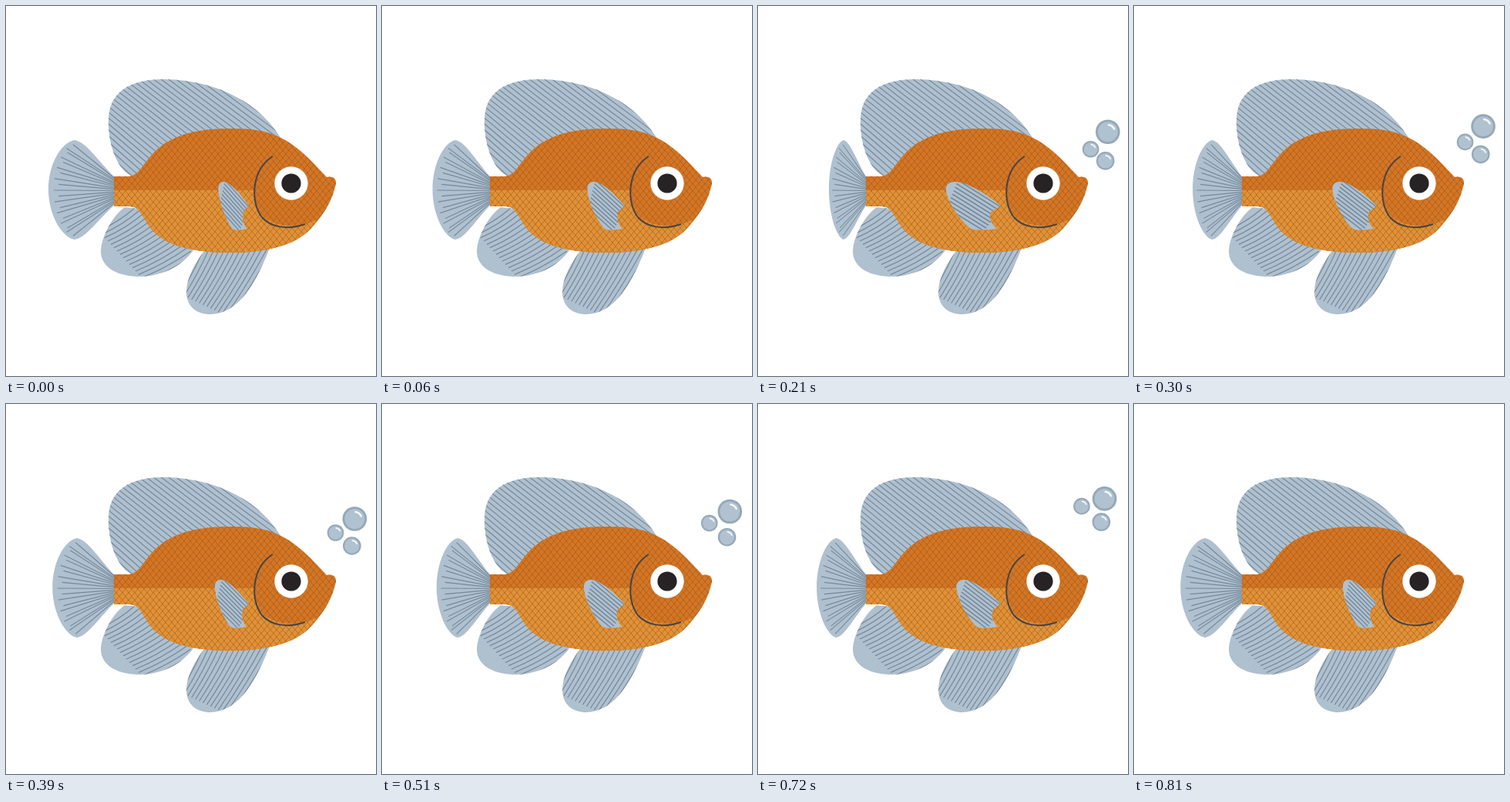
These frames come from a looping animation (480 px wide and 480 px high, 0.84 s). An HTML page with a canvas:

```html
<!DOCTYPE html>
<html lang="en">
<head>
<meta charset="utf-8">
<title>Swimming fish</title>
<style>
html, body { margin: 0; width: 100%; height: 100%; overflow: hidden; background: #fff; }
canvas { display: block; }
</style>
</head>
<body>
<canvas id="stage" width="480" height="480"></canvas>
<script>
const ctx = document.getElementById('stage').getContext('2d');
const LOOP = 840, STEP = 30, FLAP = 420;
const FIN = '#afc0cf', RAY = '#75899b';

const shapes = {
  dorsal: new Path2D('M162 220C143 211 132 177 133 147C134 112 160 95 205 95C276 96 332 128 358 174L300 215Z'),
  anal: new Path2D('M154 261C137 273 123 301 123 319C124 341 147 351 174 351C203 350 226 339 243 317L190 265Z'),
  pelvic: new Path2D('M259 315C245 334 234 352 234 372C235 391 248 400 265 400C304 399 326 355 342 314Z'),
  tail: new Path2D('M140 221C122 204 104 176 89 174C71 177 55 206 55 238C55 270 72 300 89 303C104 301 122 274 140 259Z'),
  pectoral: new Path2D('M282 228C277 228 275 233 275.5 239C277 257 286 277 292 287C295 292 301 291 312.5 289C308 283 306 276 308 267L315 259C307 248 292 228 282 228Z'),
  body: new Path2D('M140 221H158C187 221 176 159 290 159C352 158 374 176 416 222C424 220 429 224 428 231C423 252 415 267 398 286C380 308 344 320 290 320C163 319 191 260 160 260H140Z'),
  belly: new Path2D('M140 239H322C323 270 342 291 388 283L410 275V330H140Z'),
  gill: new Path2D('M346 195C319 212 316 253 332 274C343 287 365 291 388 283')
};

const lerp = (a, b, k) => a + (b - a) * k;

function clipped(path, paint) {
  ctx.save();
  ctx.clip(path);
  paint();
  ctx.restore();
}

// Rays blend from the first line to the last; each is [x0, y0, x1, y1].
function fin(path, first, last, count, bend = 0, extend = 0) {
  ctx.fillStyle = FIN;
  ctx.fill(path);
  clipped(path, () => {
    ctx.strokeStyle = RAY;
    ctx.lineWidth = 1.2;
    ctx.beginPath();
    for (let i = 0; i < count; i++) {
      const [x0, y0, x1, y1] = first.map((v, j) => lerp(v, last[j], i / (count - 1)));
      ctx.moveTo(x0 - (x1 - x0) * extend, y0 - (y1 - y0) * extend);
      ctx.quadraticCurveTo((x0 + x1) / 2 + bend, (y0 + y1) / 2 + bend, x1, y1);
    }
    ctx.stroke();
  });
}

function tail() {
  ctx.fillStyle = FIN;
  ctx.fill(shapes.tail);
  clipped(shapes.tail, () => {
    ctx.strokeStyle = RAY;
    ctx.lineWidth = 1.2;
    ctx.beginPath();
    for (let i = 0; i < 19; i++) {
      const k = i / 9 - 1;
      const reach = i % 2 ? 78 : 72;
      const angle = k * 0.93;
      ctx.moveTo(142, 239.5 + k * 15);
      ctx.lineTo(140 - reach * Math.cos(angle * 0.8), 239 + 66 * Math.sin(angle) * 1.12);
    }
    ctx.stroke();
  });
}

function scaleAbout(x, sx, paint) {
  ctx.save();
  ctx.translate(x, 0);
  ctx.scale(sx, 1);
  ctx.translate(-x, 0);
  paint();
  ctx.restore();
}

function disc(x, y, r, color) {
  ctx.fillStyle = color;
  ctx.beginPath();
  ctx.arc(x, y, r, 0, Math.PI * 2);
  ctx.fill();
}

function body() {
  ctx.fillStyle = '#d27626';
  ctx.fill(shapes.body);
  clipped(shapes.body, () => {
    ctx.fillStyle = '#df9238';
    ctx.fill(shapes.belly);
    ctx.strokeStyle = 'rgba(154,76,12,.5)';
    ctx.lineWidth = 1;
    ctx.beginPath();
    for (let x = -60; x < 440; x += 8) {
      ctx.moveTo(x, 155);
      ctx.lineTo(x + 142, 325);
      ctx.moveTo(x + 142, 155);
      ctx.lineTo(x, 325);
    }
    ctx.stroke();
  });
  ctx.strokeStyle = '#46424a';
  ctx.lineWidth = 2;
  ctx.stroke(shapes.gill);
  disc(370, 230, 21.7, '#fff');
  disc(370, 230, 12.6, '#272324');
}

function bubble(x, y, r) {
  disc(x, y, r, '#94a8b8');
  disc(x, y, r * 0.82, '#b0c1cf');
  ctx.strokeStyle = '#f4f8fa';
  ctx.lineWidth = r * 0.16;
  ctx.lineCap = 'round';
  ctx.beginPath();
  ctx.arc(x, y, r * 0.58, -1.45, -0.4);
  ctx.stroke();
  ctx.lineCap = 'butt';
}

function bubbles(t) {
  if (t < 90 || t >= 750) return;
  const k = (t - 150) / 480;
  bubble(454.3 - 4 * k, 168 - 38 * k, 15.8);
  bubble(433 - 11 * k, 192 - 50 * k, 10.8);
  bubble(451.3 - 5 * k, 206.5 - 45 * k, 11.8);
}

function draw(t) {
  const flap = 1 - Math.abs(1 - (t % FLAP) / (FLAP / 2));
  ctx.fillStyle = '#fff';
  ctx.fillRect(0, 0, 480, 480);
  fin(shapes.dorsal, [130, 190, 165, 222], [270, 95, 365, 165], 28, 0, 1);
  fin(shapes.anal, [120, 292, 167, 262], [180, 357, 245, 322], 16, 3);
  fin(shapes.pelvic, [226, 374, 258, 312], [290, 404, 345, 316], 14, 2);
  scaleAbout(140, lerp(1, 0.565, flap), tail);
  body();
  scaleAbout(315, lerp(1, 1.8, flap), () =>
    fin(shapes.pectoral, [276, 262, 303, 292], [284, 226, 316, 262], 9, 1));
  bubbles(t);
}

const start = performance.now();
function tick() {
  const t = (performance.now() - start) % LOOP;
  draw(Math.floor(t / STEP) * STEP);
  requestAnimationFrame(tick);
}
tick();
</script>
</body>
</html>
```
